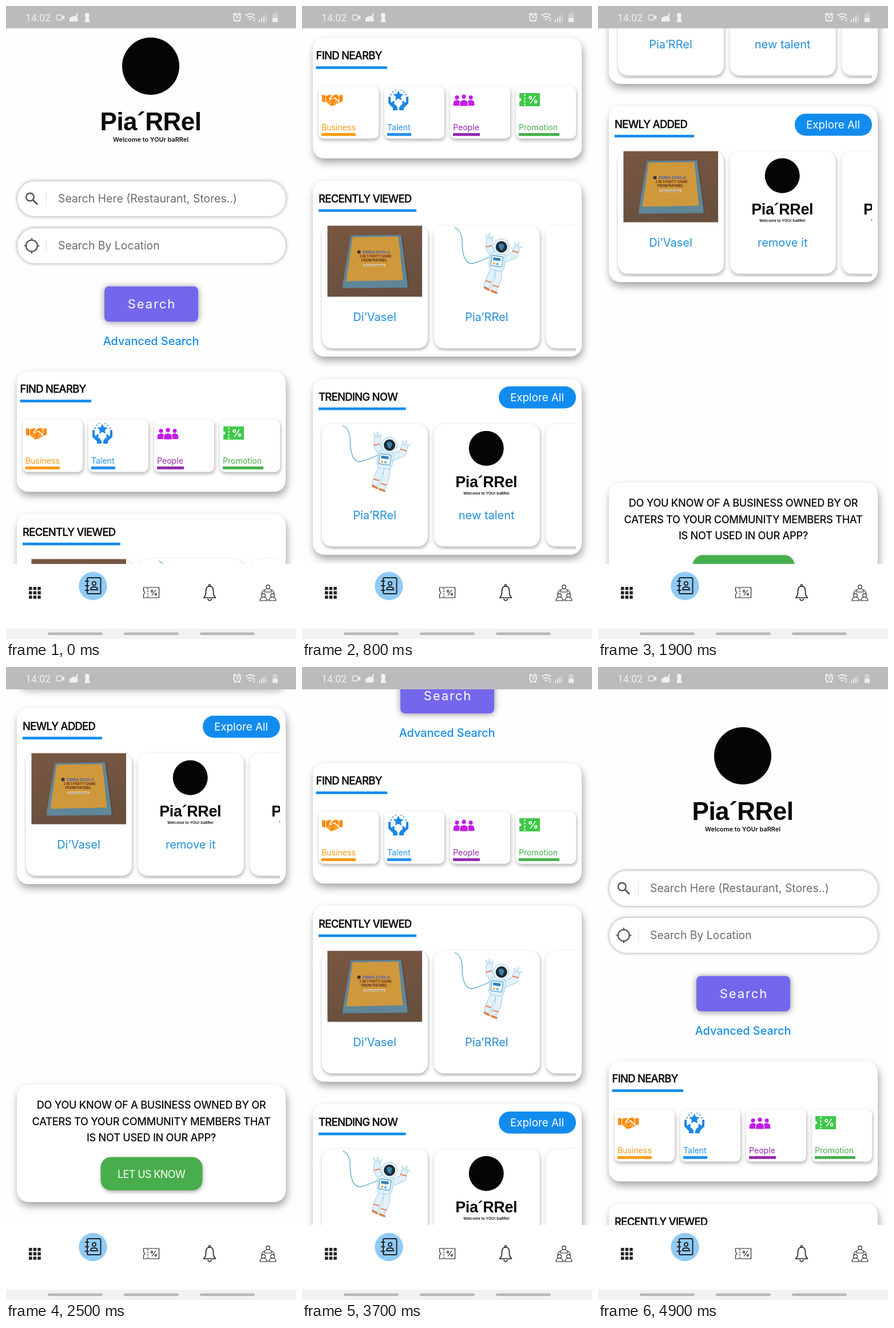
Animation, 507 px wide and 1105 px high, one loop 5 s. Source, as an HTML page:

```html
<!DOCTYPE html>
<html lang="en">
<head>
<meta charset="utf-8">
<title>Nearby search</title>
<style>
  html, body { margin: 0; width: 100%; height: 100%; overflow: hidden; background: #fff; }
  #stage { position: relative; width: 507px; height: 1105px; overflow: hidden; }
  #view { position: absolute; left: 0; top: 39px; width: 507px; height: 935px; overflow: hidden; background: #fefefe; }
  svg { position: absolute; left: 0; top: 0; display: block; }
  text { font-family: Inter, "Open Sans", sans-serif; }
  .mark { font-family: "Liberation Sans", Arial, sans-serif; font-weight: 700; letter-spacing: -.5px; }
  .clock { font-family: Roboto, sans-serif; }
  .card { filter: drop-shadow(2px 7px 7px rgba(60, 50, 60, .45)); }
  .tile { filter: drop-shadow(1px 3px 3px rgba(60, 50, 60, .4)); }
  .field { filter: drop-shadow(0 0 3px rgba(70, 60, 70, .55)); }
  .button { filter: drop-shadow(0 1px 6px rgba(70, 60, 70, .6)); }
  .glow { fill: #2196f3; fill-opacity: .3; }
</style>
</head>
<body>
<div id="stage">
  <div id="view"></div>
  <svg id="chrome" width="507" height="1105"></svg>
</div>
<script>
const BLUE = '#118cee';
const BRAND = 'Pia’RRel';
const LOOP = 5000, STEP = 100;

const rect = (x, y, w, h, r, fill, more = '') =>
  `<rect x="${x}" y="${y}" width="${w}" height="${h}" rx="${r}" fill="${fill}" ${more}/>`;
const circle = (x, y, r, fill, more = '') =>
  `<circle cx="${x}" cy="${y}" r="${r}" fill="${fill}" ${more}/>`;
const path = (d, fill, more = '') => `<path d="${d}" fill="${fill}" ${more}/>`;
const line = (d, color, width, more = '') =>
  path(d, 'none', `stroke="${color}" stroke-width="${width}" ${more}`);
const text = (x, y, s, size, fill, more = '') =>
  `<text x="${x}" y="${y}" font-size="${size}" fill="${fill}" ${more}>${s}</text>`;
const at = (x, y, inner, scale = 1) =>
  `<g transform="translate(${x} ${y}) scale(${scale})">${inner}</g>`;
const MID = 'text-anchor="middle"';
const ROUND = 'stroke-linecap="round" stroke-linejoin="round"';

// Brand block, centred on x = 0
const logo = () =>
  circle(0, 65, 50, '#050505') +
  text(0, 177, 'Pia´RRel', 44, '#080808', `class="mark" ${MID}`) +
  text(0, 197, 'Welcome to YOUr baRRel', 10.9, '#111', `font-weight="600" ${MID}`);

function field(y, label, icon) {
  return rect(20, y, 469, 61, 30, '#fff', 'class="field"') + icon +
    line(`M70.5 ${y + 20}v22`, '#dcdcdc', 1) +
    text(91, y + 37, label, 19.4, '#6c6c6c');
}

const lens = circle(42, 383.5, 6.8, 'none', 'stroke="#555" stroke-width="2.4"') +
  line('M47 388.500l8 8', '#555', 2.8);
const aim = circle(45, 468.5, 10, 'none', 'stroke="#555" stroke-width="2.2"') +
  line('M45 455v5M45 477v5M31.500 468.500h5M53.500 468.500h5', '#555', 2.2);

const heading = (x, y, s, w) =>
  text(x, y, s, 18.5, '#080808', 'font-weight="500" letter-spacing="-.75" stroke="#080808" stroke-width=".3"') +
  rect(x, y + 12.3, w, 4.6, 0, BLUE);

// Category icons, drawn from their top left corner
const hands = path('M0 2l6 1v12l-6-1zM30 3l6-1v12l-6 1zM7 4l6-2 4 1-5 6q2 4 7 0l2-1 8 7q0 3-4 3-1 3-5 2-3 3-6 0l-7-6zM20 3l5-2 4 3v8l-7-6-5 3q-2 1-3 0z', '#fb8b0c') +
  line('M10 15l4-3M13 18l3-3M20 15l4 4M22 12l5 5', '#fff', .9);

function talent() {
  let star = '';
  for (let i = 0; i < 10; i++) {
    const a = i * Math.PI / 5 - Math.PI / 2, r = i % 2 ? 4.6 : 9.5;
    star += `${i ? 'L' : 'M'}${(18.5 + r * Math.cos(a)).toFixed(1)} ${(11 + r * Math.sin(a)).toFixed(1)}`;
  }
  const hand = path('M1 13q2-2 4 0v8l2 2 2-3q3-1 3 2l-1 3q5 3 6 7v4H9v-4L1 24z', '#1b87e6');
  return path(star + 'Z', '#1b87e6') + hand +
    `<g transform="translate(37 0) scale(-1 1)">${hand}</g>` +
    line('M8 3l2 2M29 3l-2 2M4 9h3M30 9h3M13 0l1 2M24 0l-1 2', '#1b87e6', 1.6);
}

const person = (x, y, k) => at(x, y,
  circle(0, 4, 4, '#c31ee8') + path('M-7 20v-5q0-5 7-6 7 1 7 6v5z', '#c31ee8'), k);
const people = person(6, 2, .9) + person(30, 2, .9) +
  `<g stroke="#fff" stroke-width="1">${person(18, 0, 1.05)}</g>`;

const promo = rect(0, 0, 36, 23, 1, '#3fc84a') + circle(0, 11.5, 3, '#fff') +
  line('M9.500 2v20', '#fff', 2, 'stroke-dasharray="3 2.600"') +
  text(24, 18, '%', 18, '#fff', `font-weight="700" ${MID}`);

const categories = [
  ['Business', 60, '#f99a10', hands, 785],
  ['Talent', 42, '#2290ec', talent(), 778],
  ['People', 47, '#9428ae', people, 786],
  ['Promotion', 71, '#45b04a', promo, 784],
].map(([name, w, color, icon, y], i) => {
  const x = 29 + 115 * i;
  return rect(x, 772, 105, 91.5, 9, '#fff', 'class="tile"') + at(x + 6, y, icon) +
    text(x + 5, 849, name, 14.1, color) + rect(x + 5, 853.8, w, 5, 0, color);
}).join('');

// Pictures, placed relative to their tile
const photo = at(9.5, 0,
  rect(0, 0, 165.5, 124, 0, 'url(#rug)') +
  path('M41 18l90-1 11 90-115 2z', '#3d2c24', 'opacity=".4"') +
  path('M41 17l88-1 11 85v7l-113 1v-8z', '#5f8699') +
  path('M44 20l80-1 8 76-99 2z', '#cf983b') +
  circle(55, 46, 3, '#333') +
  text(85, 48, 'ZIMBA DOOLA', 6.8, '#5d6a9c', `font-weight="800" ${MID}`) +
  text(84, 55, '2 IN 1 PARTY GAME', 6, '#70351f', `font-weight="700" ${MID}`) +
  text(82, 62, 'FROM PIA’RREL', 6, '#5b331c', `font-weight="700" ${MID}`) +
  rect(63, 67, 38, 4, 0, '#e6cfaa') +
  text(82, 70.5, 'A box of small games', 3.4, '#65482e', MID));

function astronaut() {
  const limb = d => line(d, '#9fcbe5', 12, ROUND) + line(d, '#e2f2fb', 10, ROUND);
  const band = d => line(d, '#ef8058', 2.2);
  return line('M36 3q11 4 13 21 0 43 18 42 12-3 32-12', '#4fa9cc', 1.3) +
    limb('M106 55L96 38 97 26') + limb('M120 60l21-9 3-11') +
    limb('M107 73l-8 15-6 16') + limb('M114 75l-2 18-7 17') +
    band('M91 37l10-2M137 44l11 3M90 96l10 3M103 104l10 3') +
    line('M89 108l7 4M101 114l8 3', '#e1814f', 4, ROUND) +
    rect(97, 46, 27, 32, 8, '#e2f2fb', 'stroke="#9fcbe5" transform="rotate(8 110 62)"') +
    rect(100, 53, 20, 18, 2, '#f7fbfe', 'stroke="#5aa9d6" stroke-width="1.4" transform="rotate(8 110 62)"') +
    rect(103, 56, 13, 5, 1, '#3383b4', 'transform="rotate(8 110 62)"') +
    circle(105, 66, 2, '#f4a63c') + circle(111, 67, 2, '#4aa8dc') +
    circle(117.5, 37, 14, '#e9f5fc', 'stroke="#9fcbe5"') +
    circle(118, 37, 10, '#1e2a35') + path('M113 33q6-5 10 2l-3 8q-6 0-7-10z', '#3d7fa6') +
    line('M94 22l-3-5M97 21v-6M100 23l3-4M142 36l-1-5M146 36l2-6M149 39l4-2', '#c5e2f2', 3.4, ROUND);
}
const badge = at(91.5, 3, logo(), .61);

function tile(x, y, pic, name) {
  return at(x, y, rect(0, 0, 185, 214, 17, '#fff', 'class="tile"') + pic +
    text(92, 166, name, 20, '#238fda', MID));
}

function shelf(y, title, w, tiles, more) {
  const row = tiles.map(([pic, name], i) => tile(35 + 195.7 * i, y + 78.5, pic, name)).join('');
  return rect(19, y, 470, 307, 20, '#fff', 'class="card"') + heading(29, y + 37.5, title, w) +
    (more ? rect(344, y + 13, 135, 38.5, 19.2, BLUE) +
      text(411, y + 39, 'Explore All', 18.8, '#fff', MID) : '') +
    `<svg x="25" y="${y + 60}" width="454" height="238" viewBox="25 ${y + 60} 454 238">${row}</svg>`;
}

const space = [astronaut(), BRAND], game = [photo, 'Di’Vasel'], blank = ['', ''];
const ask = ['DO YOU KNOW OF A BUSINESS OWNED BY OR', 'CATERS TO YOUR COMMUNITY MEMBERS THAT', 'IS NOT USED IN OUR APP?'];

const page =
  `<defs><linearGradient id="rug" x2=".3" y2="1"><stop stop-color="#795741"/><stop offset="1" stop-color="#68503f"/></linearGradient></defs>` +
  at(253, 90, logo()) +
  field(356, 'Search Here (Restaurant, Stores..)', lens) +
  field(438, 'Search By Location', aim) +
  rect(172, 539.5, 164, 61.5, 8, '#7367ee', 'class="button"') +
  text(255, 578, 'Search', 22, '#fff', `letter-spacing="1.9" ${MID}`) +
  text(253.5, 642, 'Advanced Search', 19.8, '#168ee8', `font-weight="500" ${MID}`) +
  rect(19, 688, 470, 210, 20, '#fff', 'class="card"') + heading(24.5, 725, 'FIND NEARBY', 124.5) + categories +
  shelf(937, 'RECENTLY VIEWED', 171, [game, space, blank]) +
  shelf(1283, 'TRENDING NOW', 152.5, [space, [badge, 'new talent'], blank], true) +
  shelf(1629, 'NEWLY ADDED', 139, [game, [badge, 'remove it'], [badge, '']], true) +
  rect(19, 2286, 470, 205, 20, '#fff', 'class="card"') +
  ask.map((s, i) => text(254, 2328 + 28.6 * i, s, 18.2, '#0a0a0a',
    `font-weight="500" letter-spacing="-.3" ${MID}`)).join('') +
  rect(165.5, 2412.5, 178, 58, 18, '#48ae4d', 'class="tile"') +
  text(254, 2449, 'LET US KNOW', 18, '#fff', `letter-spacing="-.6" ${MID}`);

view.innerHTML =
  `<svg id="page" width="507" height="2560" viewBox="0 39 507 2560">${page}</svg>` +
  `<svg width="507" height="935" viewBox="0 39 507 935">` +
  `<path id="topGlow" class="glow" d="M9 39H499V94Q254 168 9 94Z" style="transform-origin:0 39px"/>` +
  `<path id="endGlow" class="glow" d="M9 974H499V919Q254 845 9 919Z" style="transform-origin:0 974px"/></svg>`;

// Fixed bars
const ink = '#222', pale = '#f1eff2';
let grid = '';
for (let i = 0; i < 9; i++) grid += rect(40 + 7.6 * (i % 3), 1014 + 7.6 * (i / 3 | 0), 5.6, 5.6, .6, '#242424');

const book = rect(142, 998, 23.5, 28, 2, 'none', `stroke="${ink}" stroke-width="2"`) +
  line('M138 1004h7M138 1012h7M138 1020h7', ink, 2) +
  circle(154, 1008, 3.2, 'none', `stroke="${ink}" stroke-width="1.8"`) +
  path('M148 1019q0-5 6-5t6 5z', 'none', `stroke="${ink}" stroke-width="1.8"`);

const ticket = path('M240.500 1015h27v18h-27v-6q4-3 0-6z', 'none', `stroke="${ink}" stroke-width="1.2"`) +
  line('M248 1016v16', ink, 1.3, 'stroke-dasharray="2.500 2"') +
  text(258.5, 1029, '%', 13.5, ink, `font-weight="600" ${MID}`);

const bell = path('M345.500 1033q4-4 4-9v-3q0-8 6.500-8t6.500 8v3q0 5 4 9z', 'none',
    `stroke="${ink}" stroke-width="1.7" stroke-linejoin="round"`) +
  circle(356, 1011.3, 1.7, 'none', `stroke="${ink}" stroke-width="1.4"`) +
  line('M352.500 1035q3.500 6 7 0', ink, 1.6);

const member = (x, y) => circle(x, y, 3.3, '#fff', `stroke="${ink}" stroke-width="1.2"`) +
  path(`M${x - 6} ${y + 9}q0-6 6-6t6 6z`, '#fff', `stroke="${ink}" stroke-width="1.2"`);
const team = line('M452 1019q-5 3-5 8M464 1019q5 3 5 8M454 1037h8', ink, 1.2) +
  member(458, 1014) + member(450, 1029) + member(466, 1029);

const status = rect(0, 0, 507, 39, 0, '#bcbabd') +
  text(34, 27, '14:02', 17.8, pale, 'class="clock"') +
  rect(88.5, 15.5, 9, 9, 1.5, 'none', `stroke="${pale}" stroke-width="1.6"`) +
  path('M98 19l4-3v8l-4-3z', pale) +
  path('M111 27v-6l6-4 4 1 4-6 1 1-2 7 2 1-1 6z', pale) +
  circle(142, 16, 4, pale) + path('M139 19h6v3l2 6h-10l2-6z', pale) +
  circle(404, 20, 6, 'none', `stroke="${pale}" stroke-width="2"`) +
  line('M404 16v4h3M397 15l4-3M411 15l-4-3M399 27l2-2M409 27l-2-2', pale, 1.8) +
  line('M419 17q8-7 16 0M422 20.500q5-4 10 0M425 24q2-2 4 0', pale, 1.9) +
  path('M432 23l2-3 2 3zM432 24.500h4l-2 3z', pale) +
  line('M443 28v-4M447 28v-7M451 28v-10', pale, 2) + line('M455 28v-14', '#d3d1d4', 2) +
  rect(466, 14, 9, 14, 1.5, '#d0ced1') + rect(468.5, 12, 4, 3, 0, '#d0ced1') + rect(466, 21, 9, 7, 1, pale);

chrome.innerHTML = status + rect(0, 974, 507, 113, 0, '#fff') +
  grid + circle(152, 1012.5, 24.7, '#90caf7') + book + ticket + bell + team +
  rect(0, 1087, 507, 18, 0, '#f4f1f5') +
  [73, 206, 339].map(x => rect(x, 1093.5, 96, 4.6, 2.3, '#b8b6b9')).join('');

// Motion: [ms, value] tables, held for one step at a time
const scroll = [[0, 50], [100, 120], [200, 270], [300, 420], [400, 531], [500, 596], [600, 626], [700, 632],
  [1500, 632], [1600, 740], [1700, 1010], [1800, 1260], [1900, 1454], [2000, 1540], [2100, 1557],
  [3400, 1557], [3500, 1470], [3600, 1080], [3700, 520], [3800, 0], [LOOP, 0]];
const topPull = [[0, 0], [3700, 0], [3800, .6], [3900, 1], [4000, .9], [4500, 0], [LOOP, 0]];
const endPull = [[0, 0], [2000, 0], [2100, .6], [2400, 0], [LOOP, 0]];

function valueAt(table, t) {
  const i = Math.max(1, table.findIndex(p => p[0] >= t));
  const [t0, a] = table[i - 1], [t1, b] = table[i];
  return a + (b - a) * (t - t0) / (t1 - t0);
}

function play(el, table, style) {
  const frames = [];
  for (let t = 0; t <= LOOP; t += STEP) {
    const hold = Math.min(t, LOOP - STEP);
    frames.push({ offset: t / LOOP, easing: 'steps(1, end)', ...style(valueAt(table, hold)) });
  }
  el.animate(frames, { duration: LOOP, iterations: Infinity });
}

const pull = v => ({ transform: `scaleY(${v})`, opacity: v });
const find = id => document.getElementById(id);
play(find('page'), scroll, y => ({ transform: `translateY(${-y}px)` }));
play(find('topGlow'), topPull, pull);
play(find('endGlow'), endPull, pull);
</script>
</body>
</html>
```
